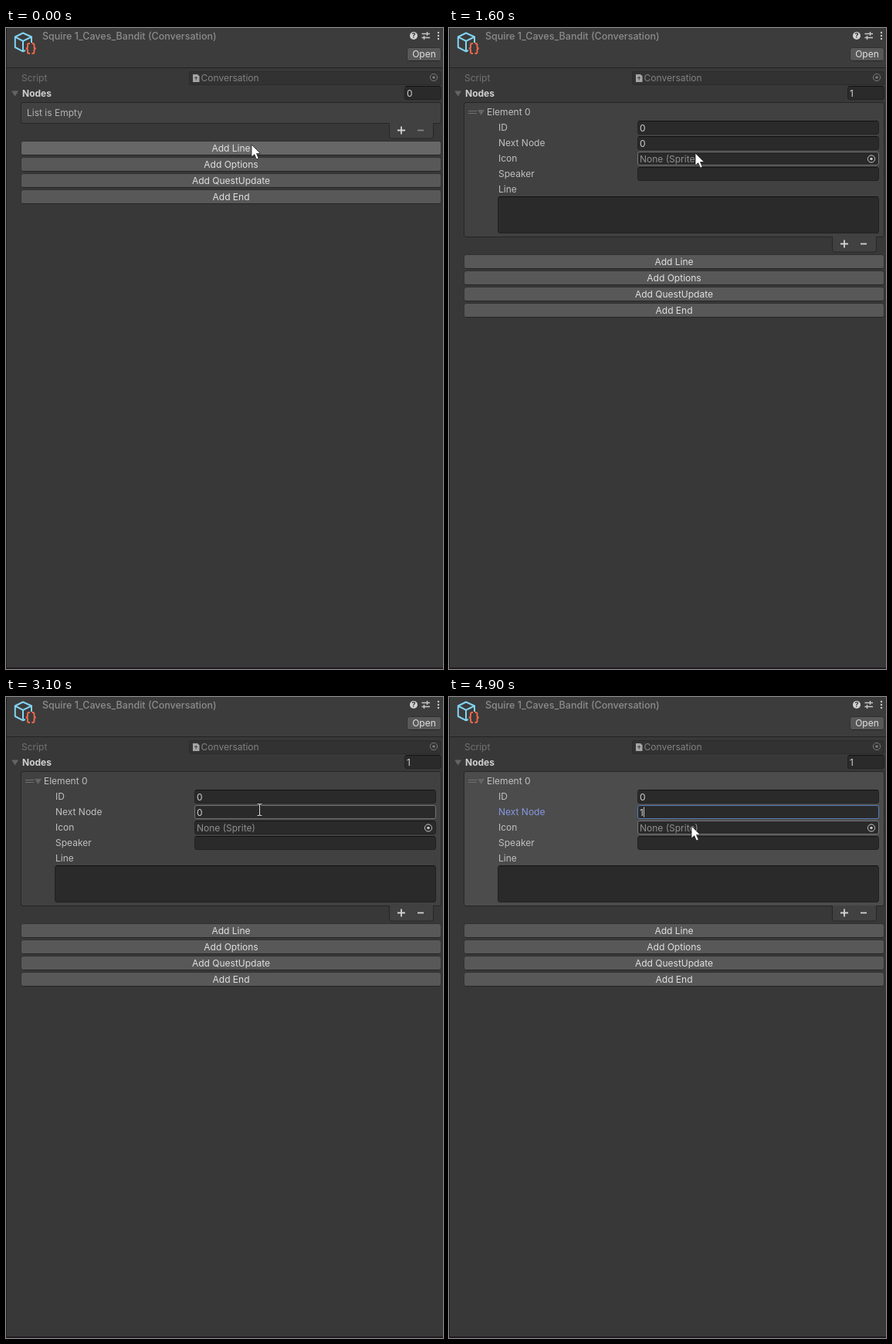
An HTML page that plays this animation: 566x830 px, repeating every 5000 ms.

```html
<!DOCTYPE html>
<html lang="en">
<head>
<meta charset="utf-8">
<title>Conversation inspector</title>
<style>
html, body { margin: 0; width: 100%; height: 100%; overflow: hidden; background: #383838; }
svg { display: block; width: 566px; height: 830px; }
text { font: 12px Inter, "Open Sans", sans-serif; white-space: pre; }
</style>
</head>
<body>
<svg id="stage" viewBox="0 0 566 830"></svg>
<script>
const LOOP = 5000;

// Pointer steps: start time, shape, x, y
const POINTER = [
  [0, 'arrow', 318, 151],
  [1100, 'beam', 320.5, 152],
  [1400, 'beam', 320, 155],
  [1500, 'arrow', 319, 161],
  [1600, 'arrow', 319, 162],
  [1700, 'beam', 324, 149],
  [1800, 'beam', 328, 137],
  [2000, 'beam', 328, 136],
  [2200, 'arrow', 327, 138.5],
  [2900, 'beam', 328.5, 147],
  [3100, 'beam', 328.5, 146],
  [3900, 'arrow', 326, 148],
  [4600, 'arrow', 324, 151],
  [4700, 'arrow', 320, 158],
  [4800, 'arrow', 316, 165],
  [4900, 'arrow', 314, 167]
];
const ADDED = 1100, FOCUSED = 3900, TYPED = 4500;

const box = (x, y, w, h, fill, stroke = 'none', r = 0) =>
  `<rect x="${x + .5}" y="${y + .5}" width="${w - 1}" height="${h - 1}" rx="${r}" fill="${fill}" stroke="${stroke}"/>`;
const text = (x, y, s, fill = '#c0c0c0', attrs = '') =>
  `<text x="${x}" y="${y}" fill="${fill}" ${attrs}>${s}</text>`;
const path = (d, attrs) => `<path d="${d}" ${attrs}/>`;
const line = (d, stroke, width = 1) => path(d, `fill="none" stroke="${stroke}" stroke-width="${width}"`);
const foldout = (x, y) => path(`M${x - 4.5} ${y - 3.5}h9l-4.5 7z`, 'fill="#646464"');

function button(x, y, w, h, label, hover) {
  return box(x - 1, y - 1, w + 2, h + 2, hover ? '#676767' : '#585858', '#303030', 3) +
    line(`M${x + 2} ${y + h + .5}h${w - 4}`, '#242424') +
    text(x + w / 2, y + h / 2 + 4.4, label, '#e0e0e0', 'text-anchor="middle"');
}

function field(x, y, w, h, border = '#212121') {
  return box(x, y, w, h, '#2a2a2a', border, 2.5) +
    (border === '#212121' ? line(`M${x + 2} ${y + .5}h${w - 4}`, '#121212') : '');
}

const picker = (x, y, color) =>
  `<circle cx="${x}" cy="${y}" r="4.6" fill="none" stroke="${color}"/><circle cx="${x}" cy="${y}" r="1.8" fill="${color}"/>`;

function header() {
  const cube = 'M33 19V11.5L22 6.5L11.8 11.5V25L22 30.3L25 29M11.8 11.5L22 16.8L33 11.5M22 16.8V30';
  const braces = 'M31 20h-1q-2 0-2 2v2.5q0 2-2.2 2q2.2 0 2.2 2v2.500q0 2 2 2h1' +
    'M33.500 20h1q2 0 2 2v2.500q0 2 2.200 2q-2.200 0-2.200 2v2.500q0 2-2 2h-1';
  return box(0, 0, 566, 52, '#3c3c3c') + line('M0 51.5H566', '#222') +
    path(cube, 'fill="none" stroke="#82d4f2" stroke-width="2" stroke-linejoin="round"') +
    line(braces, '#f2694c', 1.9) +
    text(47, 14.5, 'Squire 1_Caves_Bandit (Conversation)', '#8c8c8c', 'style="font-size:12.5px;font-weight:500"') +
    '<circle cx="528" cy="10" r="5" fill="#d2d2d2"/>' +
    text(528, 13.2, '?', '#333', 'text-anchor="middle" style="font-size:9px;font-weight:700"') +
    line('M538.5 7.500H549M538.500 12.500H549M545.500 5v5M541.500 10v5', '#c8c8c8', 1.4) +
    [6, 10, 14].map(y => `<circle cx="560" cy="${y}" r="1.2" fill="#c8c8c8"/>`).join('') +
    button(520, 26, 43, 16, 'Open') +
    text(20, 69, 'Script', '#727272') +
    box(237, 56, 327, 18, '#323232', '#2b2b2b', 2.5) +
    path('M242 60h6l2.500 2.500v7.500h-8.500z', 'fill="#a5a5a5"') +
    line('M244 64.500h4M246.200 62.500v5', '#444') +
    text(252.5, 69, 'Conversation', '#828282') + picker(554, 64, '#7b7b7b');
}

function list(bottom, fill, minusColor) {
  const y = bottom + 8.5;
  return box(19, 96, 545, bottom - 96, fill, '#262626', 2.5) +
    path(`M496.500 ${bottom - 1}v17q0 3 3 3h51q3 0 3-3v-17`, 'fill="#414141" stroke="#262626"') +
    line(`M507 ${y}h10M512 ${y - 5}v10`, '#d2d2d2', 1.8) +
    line(`M533 ${y}h8`, minusColor, 1.8);
}

function element(hoverY, focused, nextNode) {
  const rows = [['ID', '0'], ['Next Node', nextNode], ['Icon', 'None (Sprite)'], ['Speaker', '']];
  let out = line('M25 107.500H36M25 110.500H36', '#707070') + foldout(41.5, 109.5) + text(49, 113.4, 'Element 0');
  rows.forEach(([label, value], i) => {
    const y = 120 + i * 20;
    const active = focused && i === 1;
    const hover = hoverY >= y && hoverY < y + 18;
    out += text(64, y + 13.4, label, active ? '#8797e0' : '#c0c0c0') +
      field(244, y, 313, 18, active ? '#567bb8' : hover ? '#747474' : undefined) +
      text(247, y + 13.5, value, i === 2 ? '#8f8f8f' : '#d0d0d0');
    if (active) out += line(`M${value === '0' ? 254 : 252.5} ${y + 2.5}v13`, '#c8c8c8');
  });
  return out + picker(547, 169.5, '#c8c8c8') + text(64, 213.4, 'Line') + field(63, 218, 494, 48);
}

function pointer(shape, x, y) {
  const arrow = 'M0 0V16L3.700 12.700L6.500 19L9.200 17.800L6.500 11.600H11.500Z';
  const beam = 'M-3 -7.500H-1L0 -6.500L1 -7.500H3M0 -6.500V6.500M-3 7.500H-1L0 6.500L1 7.500H3';
  const shapeMarkup = shape === 'arrow'
    ? path(arrow, 'fill="#fff" stroke="#222" stroke-width=".8"')
    : line(beam, '#1c1c1c', 2.4) + line(beam, '#d8d8d8', 1.1);
  return `<g transform="translate(${x} ${y})">${shapeMarkup}</g>`;
}

function scene(time) {
  const [, shape, x, y] = POINTER.findLast(step => step[0] <= time);
  const added = time >= ADDED, focused = time >= FOCUSED;
  const bottom = added ? 271 : 124;
  const buttons = ['Add Line', 'Add Options', 'Add QuestUpdate', 'Add End'].map((label, i) => {
    const top = bottom + 23 + i * 21;
    return button(20, top, 543, 17, label, y >= top && y < top + 17);
  }).join('');
  return box(-1, -1, 568, 832, '#383838') + header() +
    foldout(11.7, 85) + text(21, 88.5, 'Nodes', '#d0d0d0', 'font-weight="700" style="font-weight:700"') +
    field(516, 75, 48, 18) + text(519, 88.5, added ? '1' : '0', '#d0d0d0') +
    list(bottom, focused ? '#4c4c4c' : '#414141', added ? '#d2d2d2' : '#858585') +
    (added ? element(y, focused, time >= TYPED ? '1' : '0') : text(27, 114.4, 'List is Empty', '#b4b4b4')) +
    buttons + line('M.5 0V830', '#1f1f1f') + line('M0 829H566', '#211a20', 2) +
    pointer(shape, x, y);
}

const stage = document.getElementById('stage');
let shown = -1;
function draw() {
  const time = Math.floor(performance.now() % LOOP / 100) * 100;
  if (time !== shown) stage.innerHTML = scene(shown = time);
  requestAnimationFrame(draw);
}
draw();
</script>
</body>
</html>
```
